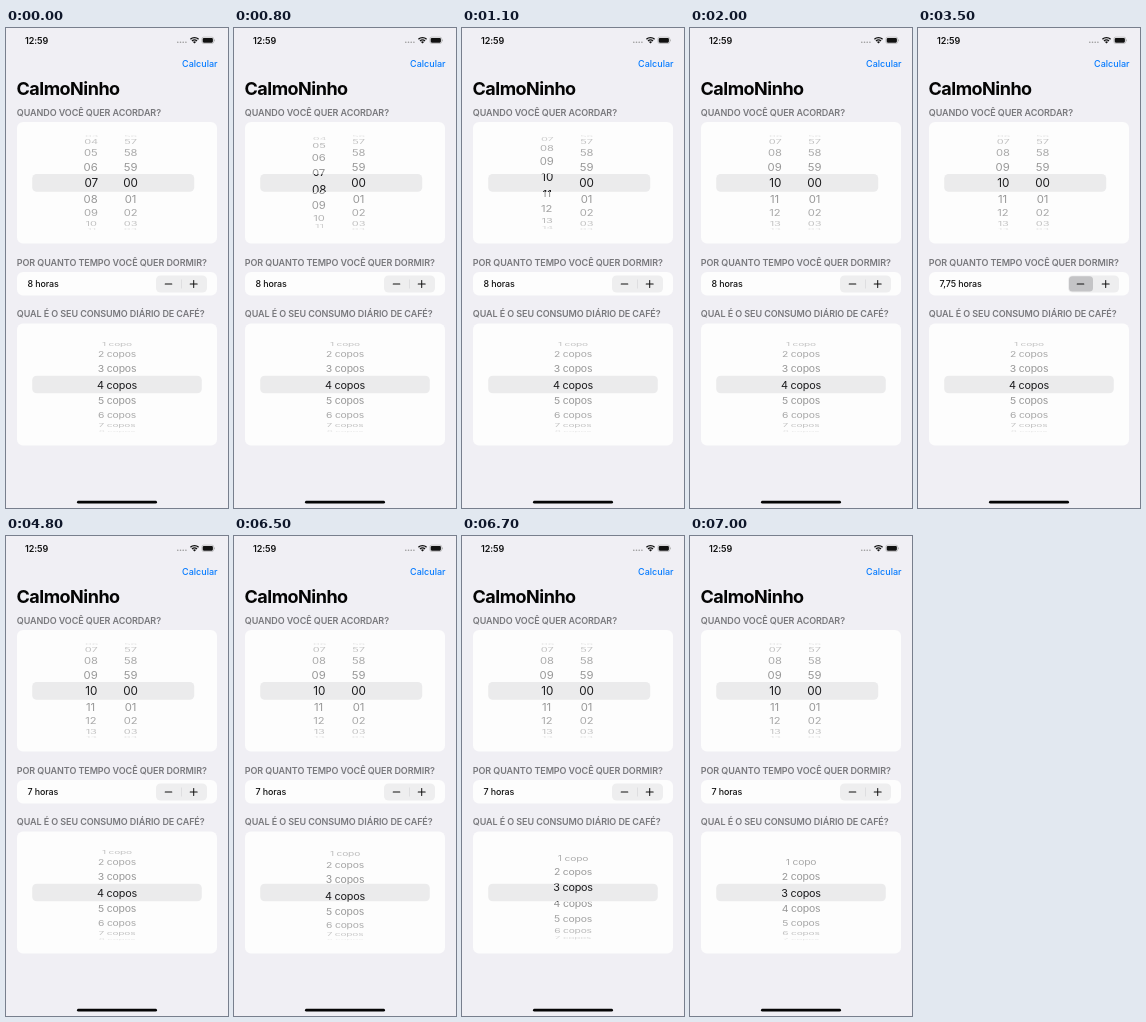
An HTML page with a canvas that plays this animation: 222x480 px, repeating every 8 s.

```html
<!DOCTYPE html>
<html lang="pt-BR">
<head>
<meta charset="utf-8">
<style>
html, body { margin: 0; width: 100%; height: 100%; overflow: hidden; background: #f0eff4; }
canvas { display: block; width: 222px; height: 480px; }
</style>
</head>
<body>
<canvas id="stage"></canvas>
<script>
const W = 222, H = 480, LOOP = 8000, STEP = 100;
const canvas = document.getElementById('stage');
const c = canvas.getContext('2d');
const dpr = window.devicePixelRatio || 1;
canvas.width = W * dpr;
canvas.height = H * dpr;

const ROW = 18, RADIUS = 47, ANGLE = Math.PI / 9;
const PRESSES = [3500, 3800, 4200, 4700];

function box(x, y, w, h, r, fill) {
  c.fillStyle = fill;
  c.beginPath();
  c.roundRect(x, y, w, h, r);
  c.fill();
}

// y is the middle of the capital letters
function text(str, x, y, weight, size, spacing, color, align = 'left') {
  c.font = `${weight} ${size}px Inter, Roboto, sans-serif`;
  c.letterSpacing = spacing + 'px';
  c.textAlign = align;
  c.fillStyle = color;
  c.fillText(str, x, y + size * 0.364);
}

// value held after each step of a movement
function stepped(t, start, from, values) {
  const i = Math.floor((t - start) / STEP);
  return i < 0 ? from : values[Math.min(i, values.length - 1)];
}

function wheelRow(label, x, y, sx, sy, size, spacing, color) {
  c.save();
  c.translate(x, y);
  c.scale(sx, sy);
  text(label, 0, 0, 400, size, spacing, color, 'center');
  c.restore();
}

// a flat row inside the band, a turning drum outside it
function wheel(col, cy, pos) {
  const { x, lean, size, spacing, label } = col;
  const first = Math.ceil(pos - 4.3), last = Math.floor(pos + 4.3);
  for (const inBand of [false, true]) {
    c.save();
    c.beginPath();
    c.rect(x - 30, cy - 9, 60, ROW);
    if (!inBand) c.rect(x - 30, cy - 60, 60, 120);
    c.clip('evenodd');
    for (let i = first; i <= last; i++) {
      const name = label(i);
      if (!name) continue;
      const d = i - pos;
      if (inBand) {
        wheelRow(name, x, cy + d * ROW, 1, 1, size, spacing, '#1c1c1e');
      } else {
        const k = Math.cos(d * ANGLE);
        wheelRow(name, x - lean * (2 * k - 1), cy + RADIUS * Math.sin(d * ANGLE),
          0.91 + 0.06 * k, 0.94 * k, size, spacing, `rgba(0,0,0,${0.03 + 0.4 * k})`);
      }
    }
    c.restore();
  }
}

const pad = (n, mod) => String((n + mod) % mod).padStart(2, '0');
const hours = { x: 85.2, lean: 0.7, size: 11.7, spacing: -0.1, label: i => pad(i, 24) };
const minutes = { x: 124.6, lean: 0, size: 11.7, spacing: -0.1, label: i => pad(i, 60) };
const cups = {
  x: 111, lean: 0, size: 10.8, spacing: -0.2,
  label: i => i < 1 ? '' : i + (i === 1 ? ' copo' : ' copos')
};

function statusBar() {
  text('12:59', 19, 12.5, 600, 9, -0.1, '#111');
  for (let i = 0; i < 4; i++) box(171 + i * 2.7, 13.4, 1.6, 1.6, 0.8, '#999');
  c.strokeStyle = c.fillStyle = '#111';
  c.lineWidth = 1.4;
  for (const r of [3.5, 5.8]) {
    c.beginPath();
    c.arc(188.5, 15.4, r, -Math.PI * 0.75, -Math.PI * 0.25);
    c.stroke();
  }
  c.beginPath();
  c.moveTo(188.5, 15.6);
  c.arc(188.5, 15.6, 2.2, -Math.PI * 0.75, -Math.PI * 0.25);
  c.fill();
  c.strokeStyle = '#aaa';
  c.lineWidth = 0.6;
  c.beginPath();
  c.roundRect(195.9, 9.1, 11.8, 6.4, 1.8);
  c.stroke();
  box(196.7, 9.9, 10.2, 4.8, 1.1, '#111');
  box(208.2, 11.3, 0.8, 2, 0.4, '#aaa');
}

function stepper(t) {
  const count = PRESSES.filter(p => t >= p).length;
  const since = count ? t - PRESSES[count - 1] : Infinity;
  const held = count === 3;
  const pressed = since < (held ? 200 : 100) ? 1 : held && since < 300 ? 0.5 : 0;

  const amount = String(8 - count / 4).replace('.', ',');
  text(amount + ' horas', 21.5, 256, 500, 8.9, -0.1, '#111');
  box(150, 247.5, 51, 17, 4.5, '#eeeeef');
  if (pressed) {
    const inset = held ? 1.3 : 0;
    c.globalAlpha = pressed;
    box(151 + inset, 248.3 + inset, 24 - 2 * inset, 15.2 - 2 * inset, 3.5, '#c4c4c6');
    c.globalAlpha = 1;
  } else {
    box(175.2, 251.5, 0.6, 9, 0, '#d3d3d6');
  }
  box(158.7, 255.4, 7.6, 1, 0.5, '#111');
  box(183.7, 255.4, 8, 1, 0.5, '#111');
  box(187.2, 251.9, 1, 8, 0.5, '#111');
}

function draw(t) {
  c.setTransform(dpr, 0, 0, dpr, 0, 0);
  c.fillStyle = '#f0eff4';
  c.fillRect(0, 0, W, H);

  statusBar();
  text('Calcular', 211.5, 36, 500, 9, 0, '#087cff', 'right');
  text('CalmoNinho', 10.5, 60.2, 700, 18, -0.5, '#050505');

  const heading = (str, y) => text(str, 10.8, y, 600, 9, -0.08, '#78787c');
  heading('QUANDO VOCÊ QUER ACORDAR?', 84.7);
  heading('POR QUANTO TEMPO VOCÊ QUER DORMIR?', 234.7);
  heading('QUAL É O SEU CONSUMO DIÁRIO DE CAFÉ?', 286.2);

  box(11, 94, 200, 121.5, 6, '#fdfdfd');
  box(11, 244, 200, 23.5, 6, '#fdfdfd');
  box(11, 295.5, 200, 122, 6, '#fdfdfd');
  box(26.2, 146, 162, 17.8, 4.5, '#ebebec');
  box(26.2, 347.7, 169.6, 17.6, 4.5, '#ebebec');

  const hour = t < 1700
    ? stepped(t, 800, 7, [7.6, 8.8, 9.9, 10.35])
    : stepped(t, 1700, 10.35, [10.25, 10.12, 10.04, 10]);
  wheel(hours, 155, hour);
  wheel(minutes, 155, 0);
  stepper(t);
  wheel(cups, 356.8, stepped(t, 6500, 4, [3.83, 3.58, 3.32, 3.13, 3.04, 3]));

  box(71, 472.8, 80, 2.8, 1.4, '#050505');
}

const begin = performance.now();
function frame() {
  draw((performance.now() - begin) % LOOP);
  requestAnimationFrame(frame);
}
frame();
</script>
</body>
</html>
```
